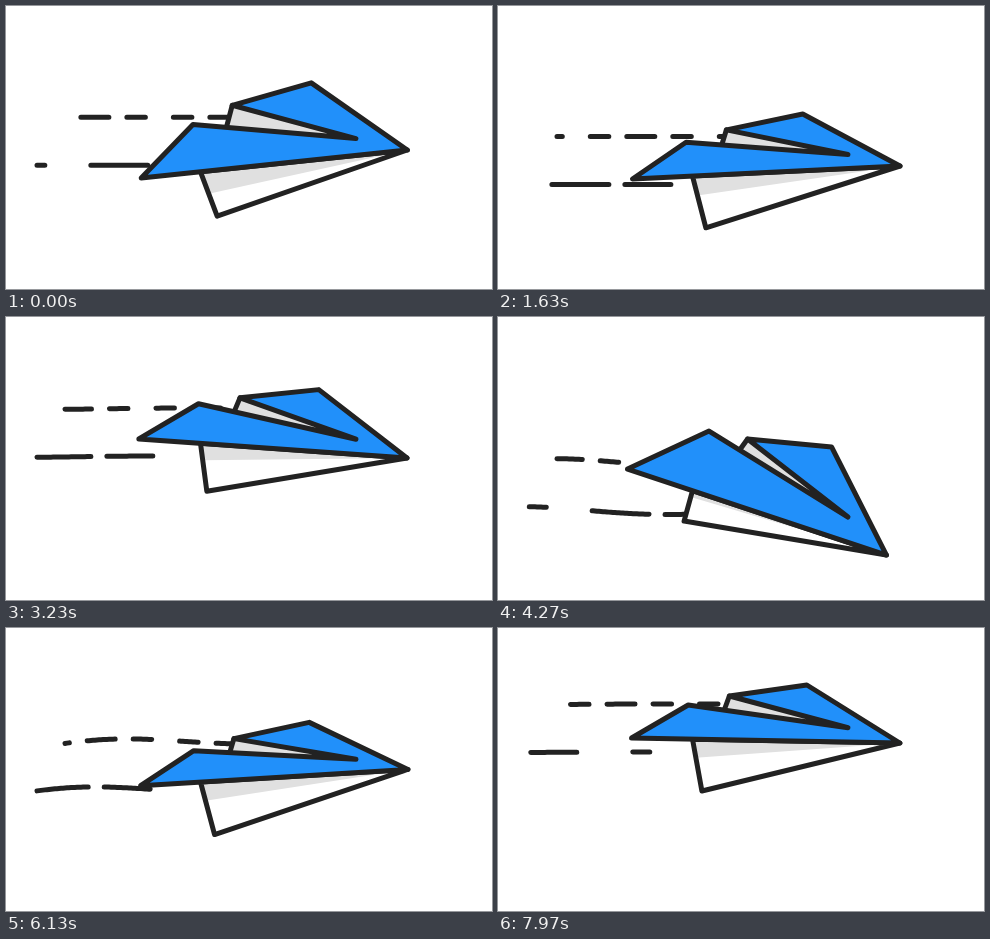
Animation of 486 by 283 pixels, one loop 8000 ms. Source, as an HTML page with a canvas:

```html
<!DOCTYPE html>
<html lang="en">
<head>
<meta charset="utf-8">
<title>Paper plane</title>
<style>
  html, body { margin: 0; width: 100%; height: 100%; overflow: hidden; background: #fff; }
  canvas { display: block; }
</style>
</head>
<body>
<canvas id="stage" width="486" height="283"></canvas>
<script>
const ctx = document.getElementById('stage').getContext('2d');
const LOOP = 8000;
const INK = '#222222', BLUE = '#2190fa', SHADE = '#e0e0e0';

// Turning points of the flight: [time, nose height, pitch]
const FLIGHT = [
  [0, 144, -28], [1630, 160, -13], [2550, 145, 4], [3230, 141, 19],
  [4270, 238, 86], [4950, 284, 84], [5430, 263, 58], [5900, 176, -1],
  [6870, 66, -45], [7500, 95, -11], [7970, 115, 5]
];

// Heights relative to the nose when climbing, level, sinking and diving
const PITCHES = [-45, 5, 58, 86];
const HEIGHTS = {
  fold: [4, -38, -103, -124],
  back: [-11, -47, -99, -116],
  right: [-35, -58, -100, -108],
  keel: [85, 48, -12, -34],
  trail: [-9, -39, -81, -89]
};

const TRAILS = [
  { left: 59, right: 227, drop: 0, speed: .1252, start: 113, dashes: [28, 18, 18.5, 28, 18.5, 18] },
  { left: 31, right: 195, drop: 48, speed: .165, start: 184, dashes: [57, 16, 46, 56, 17, 46] }
];

const mix = (a, b, k) => a + (b - a) * k;

// Smooth curve through the points that never overshoots them, clamped at both ends
function curve(xs, ys, x, flatTurns = true) {
  const last = xs.length - 1;
  x = Math.min(Math.max(x, xs[0]), xs[last]);
  let i = 0;
  while (i < last - 1 && x > xs[i + 1]) i++;
  const secant = (a, b) => (ys[b] - ys[a]) / (xs[b] - xs[a]);
  const slope = n => {
    if (n === 0) return secant(0, 1);
    if (n === last) return secant(last - 1, last);
    if (!flatTurns) return secant(n - 1, n + 1);
    const before = secant(n - 1, n), after = secant(n, n + 1);
    return before * after <= 0 ? 0 : 2 * before * after / (before + after);
  };
  const span = xs[i + 1] - xs[i], k = (x - xs[i]) / span;
  const a = slope(i) * span, b = slope(i + 1) * span, rise = ys[i + 1] - ys[i];
  return ys[i] + k * (a + k * (3 * rise - 2 * a - b + k * (a + b - 2 * rise)));
}

function flightAt(t) {
  const times = FLIGHT.map(key => key[0]);
  const track = n => curve(times, FLIGHT.map(key => key[n]), t);
  return { noseY: track(1), pitch: track(2), lift: Math.max(0, 1 - t / 1900) };
}

function poseAt({ noseY, pitch, lift }) {
  const bend = (level, tilt, curl = 0) => level + tilt * pitch + curl * pitch ** 2;
  const height = (part, raise) =>
    noseY + curve(PITCHES, HEIGHTS[part], pitch, false) - raise * lift;
  const pose = {
    nose: [bend(402, -.02, -.0016), noseY],
    tip: [bend(133.8, -.05), noseY - pitch],
    fold: [bend(189.5, .13, .0014), height('fold', 16)],
    notch: [350, noseY + bend(-14, -.245, -.0004) - 4 * lift],
    back: [bend(230.5, .17, .0006), height('back', 22)],
    right: [bend(307.5, .27, .0004) + 5 * lift, height('right', 25)],
    keel: [bend(205, -.22), height('keel', 7)],
    trailY: height('trail', 14)
  };
  const { nose, tip, back, keel } = pose;
  const hingeX = 194.5;
  pose.hinge = [hingeX, mix(tip[1], noseY, (hingeX - tip[0]) / (nose[0] - tip[0]))];
  const share = bend(.36, 0, -.00002) + .15 * lift;
  pose.shadeEnd = pose.hinge.map((v, i) => mix(v, keel[i], share));
  pose.inner = [back[0] - 7 - pitch / 20, back[1] + 20 - pitch / 20];
  return pose;
}

function shape(points, fill, stroke, closed = true) {
  ctx.beginPath();
  points.forEach(([x, y]) => ctx.lineTo(x, y));
  if (closed) ctx.closePath();
  if (fill) { ctx.fillStyle = fill; ctx.fill(); }
  if (stroke) ctx.stroke();
}

// The dive sends a wave down the trail that grows with distance from the plane
function wave(distance, t) {
  const strength = 9 * Math.exp(-(((t - 5500) / 1900) ** 4));
  const phase = (t - 5430) / 2320 - (distance - 150) / 400;
  return strength * distance / 164 * Math.cos(2 * Math.PI * phase);
}

function drawTrail({ left, right, drop, speed, start, dashes }, y, t) {
  const points = [];
  for (let x = left; x <= right; x += 2) points.push([x, y + drop + wave(right - x, t)]);
  ctx.setLineDash(dashes);
  ctx.lineDashOffset = start + speed * t;
  shape(points, null, true, false);
  ctx.setLineDash([]);
}

function drawPlane({ nose, tip, fold, notch, back, right, keel, hinge, shadeEnd, inner }) {
  shape([hinge, keel, nose], '#fff');
  shape([hinge, shadeEnd, nose], SHADE);
  shape([hinge, keel, nose], null, true);
  shape([back, inner, notch], SHADE);
  shape([back, inner], null, true, false);
  shape([tip, fold, notch, back, right, nose], BLUE, true);
}

function draw(t) {
  const pose = poseAt(flightAt(t));
  ctx.fillStyle = '#fff';
  ctx.fillRect(0, 0, 486, 283);
  ctx.strokeStyle = INK;
  ctx.lineWidth = 5;
  ctx.lineCap = ctx.lineJoin = 'round';
  TRAILS.forEach(trail => drawTrail(trail, pose.trailY, t));
  drawPlane(pose);
}

function tick() {
  draw(performance.now() % LOOP);
  requestAnimationFrame(tick);
}
tick();
</script>
</body>
</html>
```
